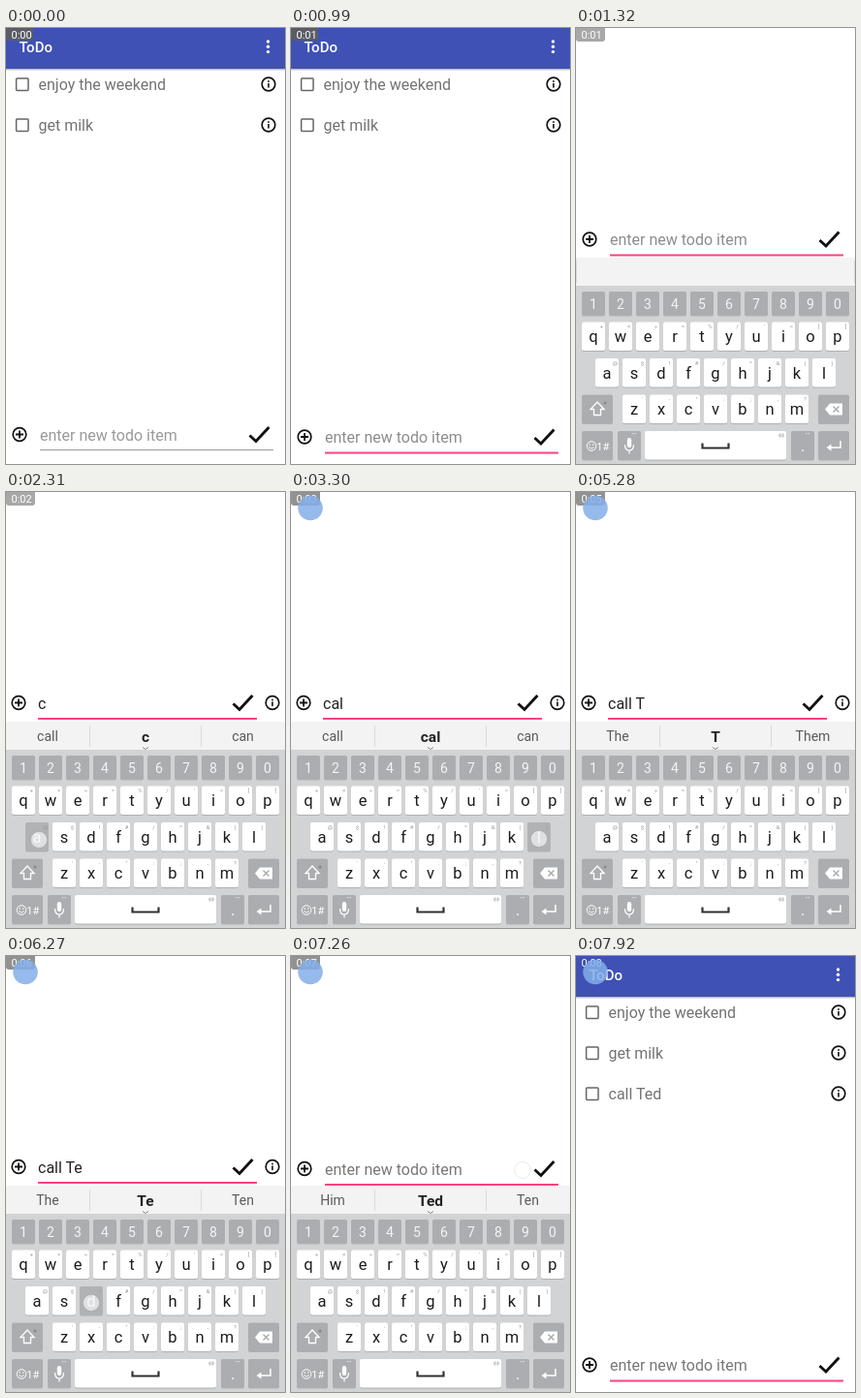
Recreate the animation shown at these times as an HTML page. Size 288x450 px, loop 8000 ms.

```html
<!DOCTYPE html>
<html lang="en">
<head>
<meta charset="utf-8">
<title>Todo list demo</title>
<style>
  html, body { margin: 0; width: 100%; height: 100%; overflow: hidden; background: #fff; }
  svg { display: block; width: 288px; height: 450px; }
  text { font-family: Roboto, "Noto Sans", sans-serif; white-space: pre; }
</style>
</head>
<body>
<svg id="stage" viewBox="0 0 288 450" xmlns="http://www.w3.org/2000/svg"></svg>
<script>
const LOOP = 8000;
const PINK = '#f8437f', KEY_GRAY = '#abadb0', INK = '#111';

const start = {
  y: 419.5, pan: 0, focus: false, keyboard: false, caps: false, bubble: 0,
  text: '', hint: '#999', items: ['enjoy the weekend', 'get milk'],
  words: [], press: '', dot: null, badge: '#5b5c66', badgeSize: [28, 13]
};

// Each step keeps the values before it and overrides a few.
const changes = [
  [0, {}],
  [660, { dot: [150, 415] }],
  [990, { focus: true, y: 422, hint: '#8c8c8c', dot: null }],
  [1320, { keyboard: true, y: 218, badge: '#a8a8a8', badgeSize: [30, 14] }],
  [1650, { dot: [116, 386] }],
  [1980, { press: 'c' }],
  [2310, { text: 'c', y: 217.5, press: 'a', dot: [34, 359], words: ['call', 'c', 'can'] }],
  [2640, { text: 'ca', press: '', dot: null, words: ['can', 'ca', 'car'] }],
  [2970, { press: 'l', dot: [256, 358], bubble: 0.4 }],
  [3300, { text: 'cal', words: ['call', 'cal', 'can'], bubble: 0.85, badge: '#929292' }],
  [3630, { text: 'call', press: '', dot: null, words: ['called', 'call', 'calls'] }],
  [3960, { dot: [142, 431] }],
  [4290, { words: ['you', 'me', 'when'], dot: [26, 387] }],
  [4620, { caps: true, dot: null }],
  [4950, { press: 't', dot: [130, 321] }],
  [5280, { text: 'call T', caps: false, press: '', dot: null, words: ['The', 'T', 'Them'] }],
  [5940, { press: 'e', dot: [74, 321] }],
  [6270, { text: 'call Te', press: 'd', dot: [88, 358], words: ['The', 'Te', 'Ten'] }],
  [6600, { text: 'call Ted', press: '', dot: null, words: ['Him', 'Ted', 'Ten'] }],
  [6930, { dot: [244, 219] }],
  [7260, { text: '', y: 219.5, hint: '#777', dot: [239, 221] }],
  [7590, { keyboard: false, y: 414, pan: -8, dot: null, badge: 'none',
           items: [...start.items, 'call Ted'] }],
  [7920, { y: 422, pan: 0 }]
];

let state = start;
const steps = changes.map(([at, change]) => ({ at, state: state = { ...state, ...change } }));

const escapeText = s => s.replace(/&/g, '&amp;').replace(/</g, '&lt;');
const label = (x, y, s, size, fill, more = '') =>
  `<text x="${x}" y="${y}" font-size="${size}" fill="${fill}" ${more}>${escapeText(s)}</text>`;
const centered = (x, y, s, size, fill, more = '') =>
  label(x, y, s, size, fill, `text-anchor="middle" ${more}`);
const box = (x, y, w, h, fill, more = '') =>
  `<rect x="${x}" y="${y}" width="${w}" height="${h}" fill="${fill}" ${more}/>`;
const line = (d, stroke, width, more = '') =>
  `<path d="${d}" fill="none" stroke="${stroke}" stroke-width="${width}" ${more}/>`;
const disc = (x, y, r, fill, more = '') =>
  `<circle cx="${x}" cy="${y}" r="${r}" fill="${fill}" ${more}/>`;
const ring = (x, y) => disc(x, y, 6.8, 'none', `stroke="${INK}" stroke-width="1.7"`);

const info = (x, y) => ring(x, y) + box(x - 0.8, y - 1, 1.6, 4.6, INK) + box(x - 0.8, y - 3.8, 1.6, 1.7, INK);
const plus = (x, y) => ring(x, y) + line(`M${x - 4} ${y}h8M${x} ${y - 4}v8`, INK, 1.8);
const tick = (x, y) => line(`M${x} ${y + 1}l6.5 6l13.5 -14.5`, INK, 2.9);

function list(s) {
  const rows = s.items.map((item, i) => {
    const y = 58 + i * 42;
    return box(10.6, y - 6, 12.4, 12.4, 'none', 'stroke="#666" stroke-width="1.5" rx="0.8"') +
      label(33.5, y + 6, item, 16, '#737373') + info(271, y);
  }).join('');
  const shadow = box(0, 42, 288, 1, '#bbb') + box(0, 43, 288, 1, '#e3e3e3');
  const menu = [14, 19.3, 24.6].map(y => disc(270.5, y, 1.7, '#fff')).join('');
  return `<g transform="translate(0 ${s.pan})">` + shadow + box(0, 0, 288, 42, '#3f51b5') +
    label(13.5, 25, 'ToDo', 15, '#fff', 'font-weight="500"') + menu + rows + '</g>';
}

function inputRow(s) {
  const { y } = s, typed = s.text !== '';
  const [left, right] = typed ? [33, 259] : [35, 276];
  const rule = s.focus ? box(left, y + 15.5, right - left, 2, PINK)
                       : box(left, y + 15.5, right - left, 1, '#999');
  return plus(typed ? 13 : 14, y) +
    label(left, y + 6, typed ? s.text : 'enter new todo item', 16, typed ? '#222' : s.hint) +
    tick(typed ? 234.5 : 251.5, y) + (typed ? info(275, y) : '') + rule;
}

function suggestions(words) {
  let out = box(0, 237, 288, 29, '#f3f3f3');
  if (!words.length) return out + line('M0.5 240v23M287.5 240v23', '#ddd', 1);
  const weight = words[1] === 'me' ? 400 : 700;
  return out + line('M86.5 241v22M201.5 241v22', '#dadada', 1) +
    centered(43, 257, words[0], 14, '#5a5a5a') +
    centered(144, 258, words[1], 15.5, '#222', `font-weight="${weight}"`) +
    centered(244.5, 257, words[2], 14, '#5a5a5a') +
    line('M141 263.5l3 2l3 -2', '#888', 1);
}

const key = (x, y, w, h, fill) =>
  box(x, y + 1, w, h, '#aeb0b2', 'rx="2"') + box(x, y, w, h, fill, 'rx="2"');

function letterRow(s, letters, marks, left, top) {
  return [...letters].map((letter, i) => {
    const x = left + i * 28, pressed = s.press === letter;
    return key(x, top, 24, 29.5, pressed ? '#b0b2b4' : '#fff') +
      centered(x + 12, top + 20.5, s.caps ? letter.toUpperCase() : letter, 16.5, pressed ? '#eee' : '#1c1c1c') +
      centered(x + 20.5, top + 6.5, marks[i], 6, '#999');
  }).join('');
}

function keyboard(s) {
  const digits = [...'1234567890'].map((d, i) =>
    key(6 + i * 28, 272, 24, 24.5, KEY_GRAY) + centered(18 + i * 28, 289.5, d, 14, '#f4f4f4')).join('');
  const letters = letterRow(s, 'qwertyuiop', "+×÷=%/'<[]", 6, 303.5) +
    letterRow(s, 'asdfghjkl', '@$!#/^&()', 20, 341) +
    letterRow(s, 'zxcvbnm', "'-\":;,?", 48, 378.5);
  const side = [[6, 378.5, 32], [250, 378.5, 32], [6, 416, 32], [43, 416, 24], [222, 416, 24], [250, 416, 32]]
    .map(([x, y, w]) => key(x, y, w, 29.5, KEY_GRAY)).join('');
  const shift = `<path d="M22 386l7 7.5h-3.5v6h-7v-6h-3.5z" fill="${s.caps ? '#fff' : 'none'}" stroke="#fff" stroke-width="1.3"/>` +
    disc(30, 387, 1.6, '#888');
  const erase = '<path d="M257 393.5l5 -6h13v12h-13z" fill="#fff"/>' +
    line('M265.5 390.5l6 6m0 -6l-6 6', KEY_GRAY, 1.5);
  const smile = disc(16, 431.5, 4.8, 'none', 'stroke="#fff"') + disc(14.3, 430, 0.8, '#fff') +
    disc(17.7, 430, 0.8, '#fff') + line('M13.3 432.6q2.7 3 5.4 0', '#fff', 0.9) +
    label(21.3, 435.5, '1#', 11, '#fff');
  const mic = box(52.8, 423, 4.4, 10, '#fff', 'rx="2.2"') +
    line('M50.5 430q0 6 4.5 6t4.5 -6M55 436v3.5', '#fff', 1.2);
  const space = key(71, 416, 146, 29.5, '#fff') + line('M130.5 428.5v5h27v-5', '#333', 2.2) +
    line('M211 418.7l-2 1.8l2 1.8zM213 418.7l2 1.8l-2 1.8z', '#aaa', 0.8);
  const enter = line('M273 426v7h-11', '#fff', 1.5) + '<path d="M258.5 433l5 -3.5v7z" fill="#fff"/>';
  const more = [60, 239].map(x => centered(x, 420.5, '•••', 5, '#eee')).join('');
  return box(0, 266, 288, 184, '#d2d3d4') + suggestions(s.words) + digits + letters + side +
    shift + erase + smile + mic + space + enter + more + centered(234, 437, '.', 16, '#fff');
}

function overlay(s, seconds) {
  const [w, h] = s.badgeSize;
  let out = `<path d="M0 0H${w}V${h - 3}q0 3 -3 3H3q-3 0 -3 -3z" fill="${s.badge}"/>` +
    label(5.5, 10.5, `0:0${seconds}`, 11, '#fff');
  if (s.bubble) out += disc(20, 16.5, 12.8, '#82aee8', `opacity="${s.bubble}"`);
  if (s.dot) out += disc(s.dot[0], s.dot[1], 8.5, '#fff', 'fill-opacity="0.6" stroke="#000" stroke-opacity="0.09"');
  return out;
}

const secondsAt = t => t < 990 ? 0 : Math.max(1, Math.floor((t + 80) / 1000));
const stage = document.getElementById('stage');
let shown;

function draw(t) {
  const step = steps.findLast(({ at }) => at <= t);
  if (step === shown) return;
  shown = step;
  const s = step.state;
  stage.innerHTML = box(0, 0, 288, 450, '#fff') + (s.keyboard ? keyboard(s) : list(s)) +
    inputRow(s) + overlay(s, secondsAt(step.at));
}

const begun = performance.now();
function tickFrame() {
  draw((performance.now() - begun) % LOOP);
  requestAnimationFrame(tickFrame);
}
tickFrame();
</script>
</body>
</html>
```
